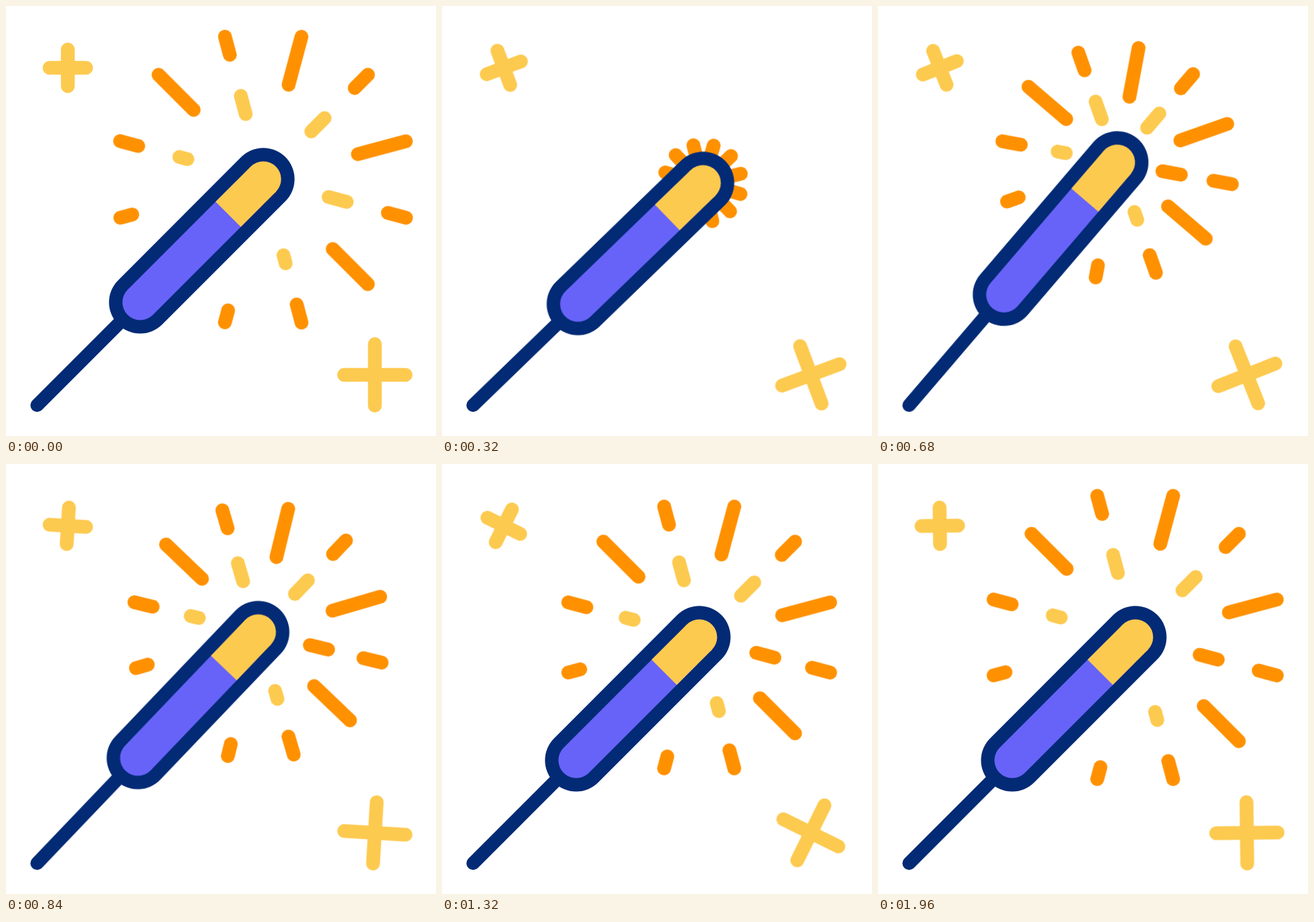
Write an HTML page that moves like this. It is 640 px wide and 640 px high and loops after 2 s.

```html
<!DOCTYPE html>
<html lang="en">
<head>
<meta charset="utf-8">
<title>Sparkler</title>
<style>
  :root { --navy: #032a75; --violet: #6763f8; --yellow: #fdca50; --orange: #ff9100; }
  html, body { margin: 0; width: 100%; height: 100%; overflow: hidden; background: #fff; }
  svg { display: block; width: 100vw; height: 100vh; }
  .round { stroke-linecap: round; }

  .wand {
    transform-origin: 46.3px 594.3px;
    animation: wobble 2s cubic-bezier(.5, 0, .5, 1) infinite;
  }
  @keyframes wobble {
    0%, 12% { transform: rotate(0deg); }
    24% { transform: rotate(4.5deg); }
    36% { transform: rotate(-4.8deg); }
    48% { transform: rotate(2.1deg); }
    60%, 100% { transform: rotate(0deg); }
  }

  /* Rays fly off the stage, then burst again from behind the wand. */
  .ray { animation: burst 2s linear infinite; }
  .ray.turning { animation: burst 2s linear infinite, recolor 2s step-end infinite; }
  @keyframes burst {
    0% { transform: translateX(0px); }
    12% { transform: translateX(var(--exit)); }
    12.001% { transform: translateX(calc(var(--inset) * -1.7)); }
    36% { transform: translateX(calc(var(--inset) * -.3)); }
    100% { transform: translateX(0px); }
  }
  @keyframes recolor {
    0% { stroke: var(--yellow); }
    12%, 100% { stroke: var(--orange); }
  }

  .star {
    fill: none;
    stroke: var(--yellow);
    animation: spin 2s linear infinite;
  }
  @keyframes spin {
    0% { transform: rotate(0deg); animation-timing-function: cubic-bezier(.5, 0, .5, 1); }
    85.5% { transform: rotate(-365deg); }
    100% { transform: rotate(-360deg); }
  }
</style>
</head>
<body>
<svg viewBox="0 0 640 640" stroke-width="20.6">
  <g transform="translate(92 92)"><path class="star round" d="M-27.2 0H27.2M0 -27.2V27.2"/></g>
  <g transform="translate(549 549)"><path class="star round" d="M-45.7 0H45.7M0 -45.7V45.7"/></g>
  <g class="wand">
    <g id="rays" class="round"></g>
    <g stroke="var(--navy)" class="round">
      <path d="M46.3 594.3L183 457.5" stroke-width="20"/>
      <path d="M199.8 441L383 257.7" stroke-width="93"/>
    </g>
    <path class="round" d="M199.8 441L360 280.7" stroke="var(--violet)" stroke-width="53"/>
    <path d="M330.7 310L383 257.7" stroke="var(--yellow)" stroke-width="53"/>
    <circle cx="383" cy="257.7" r="26.5" fill="var(--yellow)"/>
  </g>
</svg>
<script>
  const center = { x: 382.8, y: 258.2 };
  const stage = 640, margin = 22;
  const lengths = { long: 74, dash: 28, stub: 18.5, dot: 12.5 };
  const kinds = { L: 'long', d: 'dash', s: 'stub', '.': 'dot' };

  // One letter per direction, clockwise in steps of 30 degrees from 15.
  const outer = { radius: 219.3, color: 'orange', pattern: 'dLds sdLdLdL' };
  const inner = { radius: 128, color: 'yellow', pattern: 'd .   . d d ' };

  const lengthAt = (ring, i) => lengths[kinds[ring.pattern[i]]];
  const angleAt = i => 15 + 30 * i;

  // Way along a direction until the ray's inner end has left the stage.
  function exitWay(i) {
    const ring = lengthAt(inner, i) ? inner : outer;
    const a = angleAt(i) * Math.PI / 180;
    const reach = (from, step) => ((step > 0 ? stage + margin : -margin) - from) / step;
    const edge = Math.min(reach(center.x, Math.cos(a)), reach(center.y, Math.sin(a)));
    return edge - (ring.radius - lengthAt(ring, i));
  }

  function addRay(ring, i) {
    const length = lengthAt(ring, i);
    if (!length) return;
    const start = ring.radius - length;
    const inset = ring === outer ? 110 : start - 24;
    const turning = ring === inner && i === 0 ? ' turning' : '';
    document.getElementById('rays').insertAdjacentHTML('beforeend', `
      <g transform="translate(${center.x} ${center.y}) rotate(${angleAt(i)})">
        <path class="ray${turning}" d="M${start} 0h${length}" stroke="var(--${ring.color})"
          style="--exit: ${exitWay(i)}px; --inset: ${inset}px"/>
      </g>`);
  }

  for (const ring of [inner, outer]) {
    for (let i = 0; i < 12; i++) addRay(ring, i);
  }
</script>
</body>
</html>
```
